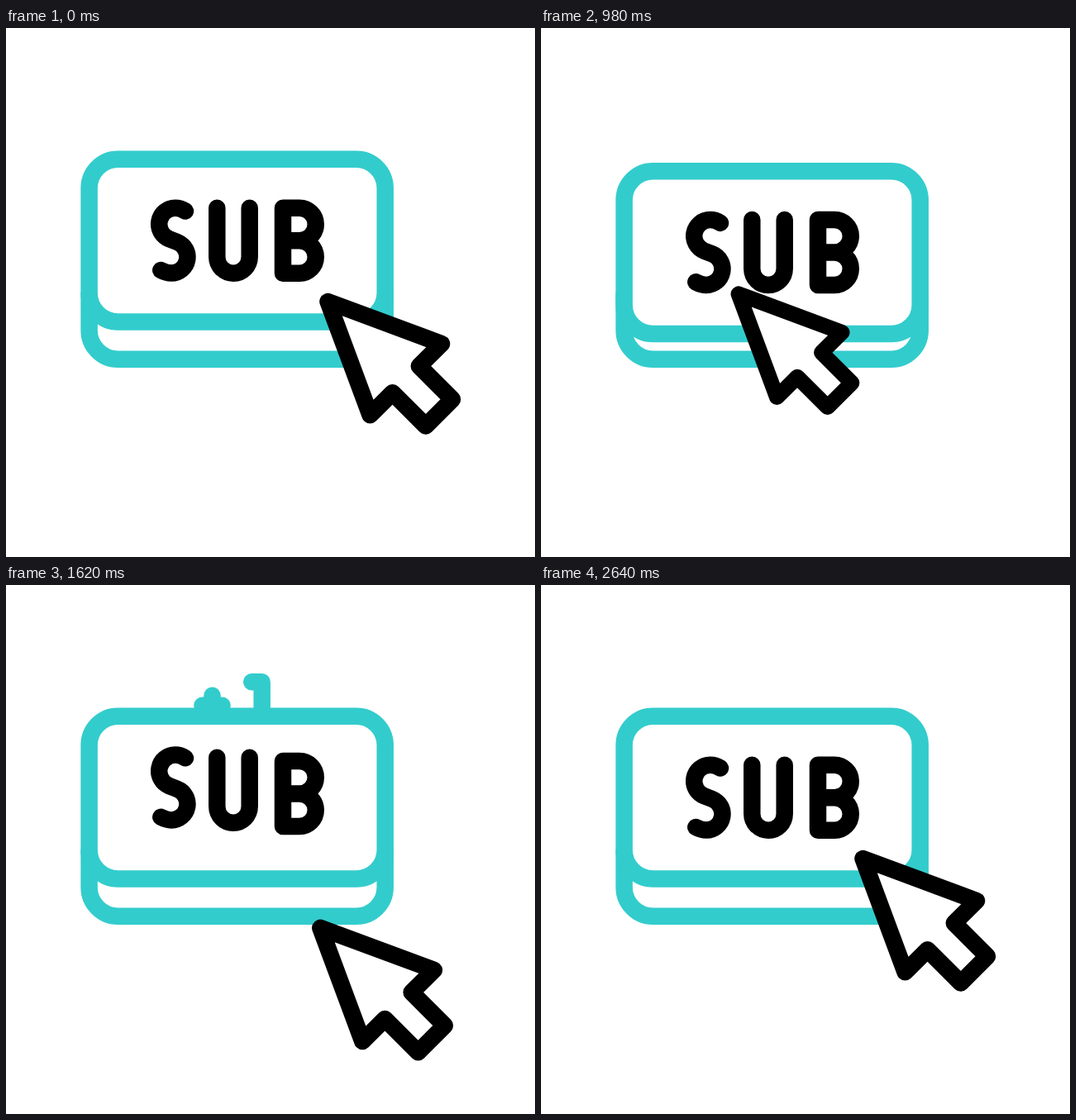
Write an HTML page that moves like this. It is 640 px wide and 640 px high and loops after 3000 ms.

```html
<!DOCTYPE html>
<html lang="en">
<head>
<meta charset="utf-8">
<title>Button click</title>
<style>
  html, body { margin: 0; width: 100%; height: 100%; overflow: hidden; background: #fff; }
  svg { display: block; width: 100%; height: 100%; }
  path, rect { stroke-width: 20.5; stroke-linejoin: round; fill: none; }
  .round { stroke-linecap: round; }
</style>
</head>
<body>
<svg viewBox="0 0 640 640" stroke="#33cccc">
  <path id="plus" class="round" d="M237.4 103H261.6M249.5 91V115.2M297.2 74.5H309.7V135.5M297.2 135.5H322"/>
  <path d="M100.6 320V365.7a35 35 0 0 0 35 35H423.7a35 35 0 0 0 35-35V320"/>
  <g id="button">
    <rect x="100.6" y="158.8" width="358.1" height="196.8" rx="35" style="fill:#fff"/>
    <g stroke="#000" class="round">
      <path class="letter" d="M217 221.5Q211 217.7 204.7 217.7A19.5 19.5 0 0 0 197.5 255.3L207.2 259A19.5 19.5 0 0 1 200 296.6Q194 296.6 187.3 293"/>
      <path class="letter" d="M255.3 217.7V277a19.7 19.7 0 0 0 39.4 0V217.7"/>
      <path class="letter" d="M335 217.7H355a19.75 19.75 0 0 1 0 39.5H335ZM335 257.2H355a19.75 19.75 0 0 1 0 39.5H335Z"/>
    </g>
  </g>
  <path id="cursor" stroke="#000" style="fill:#fff" d="M389.5 331L527 382L499.8 409L540 449.2L507.8 481.4L467.6 441.2L440.5 468.3Z"/>
</svg>
<script>
const LOOP = 3000;
const byId = id => document.getElementById(id);
const plus = byId('plus'), button = byId('button'), cursor = byId('cursor');
const letters = document.querySelectorAll('.letter');

const move = (el, x, y, extra = '') => el.setAttribute('transform', `translate(${x} ${y})${extra}`);

// Eased value at time t through [time, value] keys.
function track(t, keys) {
  if (t <= keys[0][0]) return keys[0][1];
  for (let i = 1; i < keys.length; i++) {
    const [t0, v0] = keys[i - 1], [t1, v1] = keys[i];
    if (t < t1) {
      const u = (t - t0) / (t1 - t0);
      return v0 + (v1 - v0) * u * u * (3 - 2 * u);
    }
  }
  return keys[keys.length - 1][1];
}

function draw(t) {
  const press = track(t, [[700, 0], [890, 1], [1098, 0]]);
  move(button, 0, 24.2 * press);

  letters.forEach((letter, i) => {
    const start = 1312 + 80 * i, step = 365;
    move(letter, 0, track(t, [[start, 0], [start + step, -13], [start + 2 * step, 13], [start + 3 * step, 0]]));
  });

  move(plus, 0, track(t, [[950, 98.5], [2550, -48]]));
  plus.setAttribute('opacity', t < 1000 ? 0 : track(t, [[2050, 1], [2555, 0]]));

  const x = track(t, [[200, 0], [705, -157.3], [1075, -157.3], [1715, 0]]);
  const y = track(t, [[200, 0], [705, -16], [1075, -16], [1715, 90], [2100, 90], [2605, 0]]);
  move(cursor, x, y, ` translate(465 406) scale(${1 - 0.15 * press}) translate(-465 -406)`);
}

function tick() {
  draw(performance.now() % LOOP);
  requestAnimationFrame(tick);
}
tick();
</script>
</body>
</html>
```
